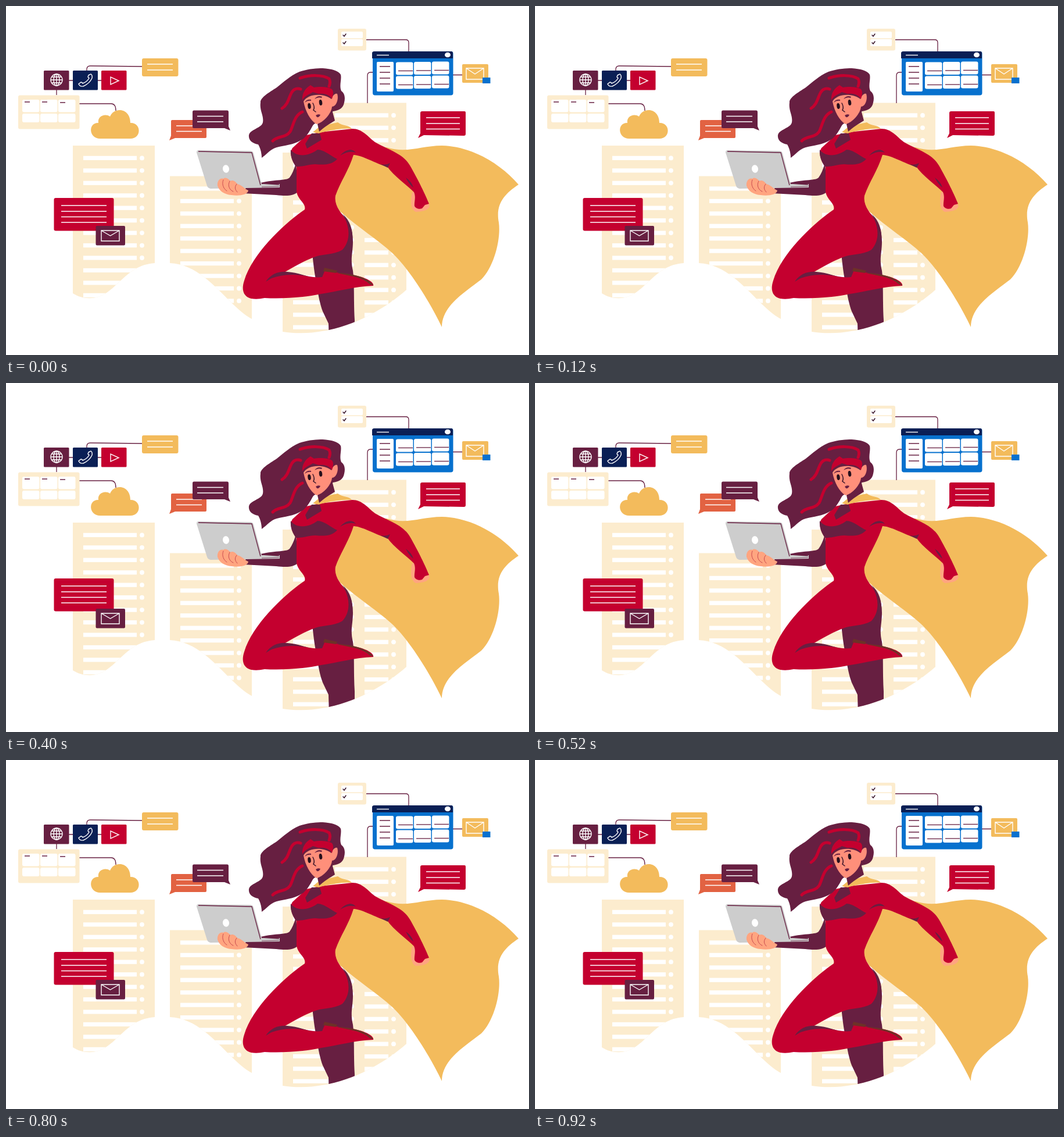
Write an HTML page that moves like this. It is 900 px wide and 600 px high and loops after 1 s.

```html
<!DOCTYPE html>
<html lang="en">
<head>
<meta charset="utf-8">
<title>Caped heroine with laptop</title>
<style>
html, body { margin: 0; width: 100%; height: 100%; overflow: hidden; background: #fff; }
svg { display: block; width: 100%; height: 100%; }
.cream { fill: #fcecce; } .gold { fill: #f3bb5c; } .red { fill: #c4002f; }
.plum { fill: #671f41; } .navy { fill: #0a1f55; } .blue { fill: #0771ce; }
.orange { fill: #e26242; } .white { fill: #fff; } .skin { fill: #ff8f7a; }
.hand { fill: #ffa580; } .grey { fill: #cdcdcd; } .brown { fill: #6d3127; }
.line { fill: none; stroke: #671f41; stroke-width: 1.3; }
.chalk { fill: none; stroke: #fff; stroke-width: 1.4; }
.strand { fill: none; stroke: #c4002f; stroke-width: 5; stroke-linecap: round; }
.ink { fill: none; stroke: #39152a; stroke-width: 1.5; stroke-linecap: round; }
</style>
</head>
<body>
<svg viewBox="0 0 900 600">
  <defs>
    <clipPath id="hills">
      <path d="M100 0H270V442H256C203 445 188 500 148 502C134 503 125 500 115 494H100ZM270 0H440V538H423C380 515 345 445 282 442H270ZM440 0H720V462L689 488C620 548 540 570 476 560H440Z"/>
    </clipPath>
  </defs>

  <g id="scene">
    <g id="servers" clip-path="url(#hills)"></g>

    <!-- left cluster -->
    <path class="line" d="M108 128H115M158 128H164M87 144V153M139 111V109Q139 103 145 103L234 104M126 168H181Q189 168 189 180"/>
    <rect class="plum" x="65" y="111" width="43.5" height="33.5" rx="1.5"/>
    <rect class="navy" x="115" y="111" width="43" height="33.5" rx="1.5"/>
    <rect class="red" x="164" y="111" width="43.5" height="33.5" rx="1.5"/>
    <g class="chalk">
      <circle cx="87" cy="127" r="10"/><ellipse cx="87" cy="127" rx="5" ry="10"/>
      <path d="M77 127H97M87 117V137M79 122H95M79 132H95"/>
      <path d="M180 122V135L194 128.500Z"/>
      <path d="M142 119L146 117Q149 119 148 124Q144 133 133 138Q127 139 125 134L129 131Q131 131 132 133Q140 130 143 124L141 122Z"/>
    </g>
    <rect class="gold" x="234" y="90" width="62.500" height="31" rx="3"/>
    <path class="chalk" d="M243 100H287M243 110H287"/>
    <rect class="cream" x="21" y="153.500" width="105.500" height="58" rx="3"/>
    <g id="cards" class="white"></g>
    <path class="line" d="M32 165H41M62 165H71M93 166H102"/>
    <path class="gold" d="M162 228C142 228 141 200 159 201C157 189 171 184 179 190C186 173 214 175 214 201C233 200 234 228 214 228Z"/>

    <!-- right cluster -->
    <path class="line" d="M619 58H688Q693 58 693 63V78M769 118.500H785M631 114H627Q622 114 622 120V167"/>
    <rect class="cream" x="571" y="39" width="49" height="37.500" rx="3"/>
    <rect class="white" x="577" y="44" width="37" height="11.500" rx="2"/>
    <rect class="white" x="577" y="57" width="37" height="12" rx="2"/>
    <path class="ink" d="M580 50L582 52L585 48M580 63L582 65L585 61"/>
    <rect class="blue" x="631" y="78" width="138.500" height="75.500" rx="4"/>
    <path class="navy" d="M630 90V81Q630 78 634 78H766Q769 78 769 81V90Z"/>
    <path class="chalk" d="M638 84.500H659"/>
    <ellipse class="white" cx="760" cy="84" rx="5" ry="4.300"/>
    <rect class="white" x="638" y="96" width="29" height="51" rx="2"/>
    <path class="line" d="M643 104H661M643 114H661M643 124H661M643 134H661"/>
    <g id="tiles"></g>
    <rect class="gold" x="785" y="100" width="45" height="32" rx="2"/>
    <path class="chalk" d="M792 107H822V126H792ZL807 117L822 107"/>
    <rect class="blue" x="820" y="123" width="13.500" height="10"/>

    <!-- floating messages: data-dy is the shift per step -->
    <g data-dy="3">
      <rect class="red" x="82.500" y="330" width="103" height="56.500" rx="3"/>
      <path class="chalk" d="M95 343H173M95 353H173M95 362.500H173M95 372H173"/>
    </g>
    <g data-dy="5">
      <rect class="plum" x="154.500" y="378" width="50.500" height="33.500" rx="2"/>
      <path class="chalk" d="M164 386H195V404H164ZL179.500 395L195 386"/>
    </g>
    <g data-dy="-3">
      <path class="orange" d="M286 196H343Q345 196 345 198V225Q345 227 343 227H291L281 231L284 223V198Q284 196 286 196Z"/>
      <path class="chalk" d="M293 206H337M293 215.500H337"/>
    </g>
    <g data-dy="-5">
      <path class="plum" d="M323 179.500H381Q383 179.500 383 182V207L386 214L376 210H323Q321 210 321 208V182Q321 179.500 323 179.500Z"/>
      <path class="chalk" d="M329 189.500H374M329 199H374"/>
      <path class="red" d="M716 181H789Q791 181 791 183V220Q791 223 788 223L719 222L709 227L713 219V184Q713 181 716 181Z"/>
      <path class="chalk" d="M723 192H781M723 202H781M723 211.500H781"/>
    </g>

    <!-- heroine -->
    <path data-dy="-5" class="gold" d="M597 240L655 243C690 254 715 240 750 240C800 241 850 270 882 307C858 323 842 340 848 372C852 400 840 448 818 470C790 492 750 515 750 552C725 500 690 448 664 424C640 402 605 380 575 353L560 330Z"/>
    <g clip-path="url(#hills)">
      <path data-dy="-5" class="plum" d="M527 425C529 445 531 460 533 470C537 495 540 512 545 525L555 546L557 620H600V540C598 510 600 480 597 455C592 435 597 425 597 405C597 380 588 366 573 353L550 380Z"/>
    </g>
    <g data-dy="-5">
      <path class="plum" d="M438 304C465 298 484 300 488 295Q494 287 499 270L503 319C495 327 482 327 465 325L408 322L414 310Z"/>
      <path class="plum" d="M563 325C561 338 570 350 582 364L568 350Z"/>

      <path class="hand" d="M699 320C695 338 698 352 706 354C715 353 728 352 729 343L706 319Z"/>
      <path class="red" d="M540 217L596 211C613 211 622 224 635 234C655 246 683 253 695 274C710 300 722 325 728 340L721 342L716 348C711 350 705 348 703 344C702 337 706 329 702 320C690 308 667 292 656 276C635 271 615 257 598 256C590 282 575 303 567 326C564 343 577 355 584 367C592 384 592 405 579 419C562 429 546 425 527 433C512 439 494 449 477 459C505 457 520 469 544 466L549 454C564 459 590 460 605 464C621 468 634 475 632 481C600 482 570 491 542 495C515 501 475 504 445 502Q432 505 422 503C410 500 404 490 410 472C424 425 480 373 514 350C517 340 502 333 500 319V277C492 267 487 253 493 244L517 222Z"/>
      <path class="plum" d="M447 474C456 460 470 456 484 457C500 458 515 464 528 467C505 461 486 461 472 464Q458 466 447 474Z"/>
      <path class="brown" d="M548 450L570 455L568 459L546 456ZM570 459C590 459 622 465 632 480Q627 480 621 474C607 465 586 463 570 459Z"/>
      <path class="plum" d="M579 357C592 374 594 400 584 415L596 406C598 385 592 369 579 357Z"/>
      <path class="plum" d="M490 247C500 261 522 258 536 247C548 247 560 259 570 263C560 274 546 273 532 272C520 272 510 277 499 276C493 268 489 258 490 247Z"/>
      <path class="plum" d="M575 257C583 248 594 243 602 252Q590 248 575 257ZM644 272Q654 274 661 270L657 278ZM688 295Q698 302 701 312Q694 307 688 295Z"/>
      <path class="gold" d="M528 217L540 207L571 200C580 207 590 204 595 211C580 210 558 213 538 219Z"/>
      <path class="plum" d="M515 237L526 219L540 219L543 230L518 245Z"/>

      <path class="plum" d="M440 261C440 251 437 243 434 238C423 236 417 230 418 222C420 212 440 210 442 200C444 188 436 180 438 166C437 158 452 149 466 140C478 131 487 121 505 113C520 108 535 107 545 107C560 108 572 111 576 118C578 126 573 137 577 146C583 150 584 158 582 166C580 176 574 179 563 181L532 202C526 204 526 215 512 228C495 240 480 239 466 243C455 246 450 254 440 261Z"/>
      <path class="strand" d="M459 232C468 222 480 228 489 216C495 204 496 188 510 182M475 176C486 169 486 158 492 148C496 142 502 141 507 143M506 124C522 118 545 118 556 125Q559 131 556 138"/>
      <path class="plum" d="M536 203L560 175L566 197C556 203 548 208 539 216Z"/>
      <path class="skin" d="M512 164C520 151 545 149 560 160C563 152 567 150 570 151C573 161 568 173 561 173C560 185 546 201 534 203C524 197 515 181 512 164Z"/>
      <path class="red" d="M510 162C509 151 514 142 524 136L530 140C540 138 554 139 561 143C565 148 562 155 561 160C556 151 546 150 538 151L528 148C522 152 514 154 510 162Z"/>
      <g fill="#26101c">
        <ellipse cx="522" cy="172" rx="2.700" ry="5" transform="rotate(-8 522 172)"/>
        <ellipse cx="541.500" cy="166" rx="2.700" ry="5" transform="rotate(-8 541.500 166)"/>
        <path class="plum" d="M514 166Q517 160 525 161L525 163Q519 162 514 166ZM531 160Q536 153 544 156L543 158Q537 156 531 160ZM533 188Q537 185 541 187Q539 192 535 191Z"/>
      </g>
      <path class="ink" d="M528 167Q532 174 529 179L533 182"/>

      <path class="grey" d="M331 248L421 249Q425 250 426 253L440 306L471 306V312L352 314Q347 313 346 309L328 252Q328 248 331 248Z"/>
      <path class="line" d="M331 250L423 252L438 308M440 305L470 307"/>
      <path class="line" d="M440 311L470 310" stroke-opacity=".5"/>
      <ellipse class="white" cx="378.500" cy="280" rx="5.500" ry="6.700" transform="rotate(-8 378.500 280)"/>
      <path class="hand" d="M364 309C363 300 369 295 374 297C378 293 384 298 386 301C391 298 396 303 398 306C405 307 410 314 417 317C416 325 400 327 388 325C375 324 367 318 364 309Z"/>
      <path fill="none" stroke="#c94a4f" stroke-linecap="round" d="M374 299C371 306 374 314 380 318M385 301C381 308 384 316 391 319M397 306Q391 313 398 320"/>
    </g>
  </g>
</svg>
<script>
const $ = id => document.getElementById(id);
const rect = (x, y, w, h, r, c) =>
  `<rect x="${x}" y="${y}" width="${w}" height="${h}" rx="${r}" class="${c}"/>`;

function server(x, top) {
  let s = rect(x, top, 141, 400, 0, "cream");
  for (let y = top + 21.4; y < 570; y += 21.45)
    s += rect(x + 18, y - 3.6, 92, 7.2, 0, "white") +
      `<circle cx="${x + 119}" cy="${y}" r="3.9" class="white"/>`;
  return s;
}
$("servers").innerHTML =
  server(115, 240) + server(282, 292.5) + server(548, 166.5) + server(476, 252);

for (let i = 0; i < 3; i++) {
  const x = 28 + i * 31, tx = 671 + i * 31;
  $("cards").innerHTML += rect(x, 161, 29.5, 21.5, 3, "white") + rect(x, 185, 29.5, 15, 3, "white");
  for (let j = 0; j < 2; j++) {
    const y = 96.5 + j * 24 - i * 0.5;
    $("tiles").innerHTML += rect(tx, y, 29.5, 22, 3, "white") +
      `<path class="line" d="M${tx + 4} ${y + 15}h25"/>`;
  }
}

// Everything bobs in held steps of 200 ms: 0, 1, 2, 1, 0.
const movers = document.querySelectorAll("[data-dy]");
const shift = (el, dy) => el.setAttribute("transform", `translate(0 ${dy})`);
const start = performance.now();

function draw() {
  const step = 2 - Math.abs(2 - Math.floor((performance.now() - start) % 1000 / 200));
  for (const m of movers) shift(m, m.dataset.dy * step);
  shift($("scene"), step % 2 / 2);  // the whole stage sits half a pixel lower midway
  requestAnimationFrame(draw);
}
draw();
</script>
</body>
</html>
```
